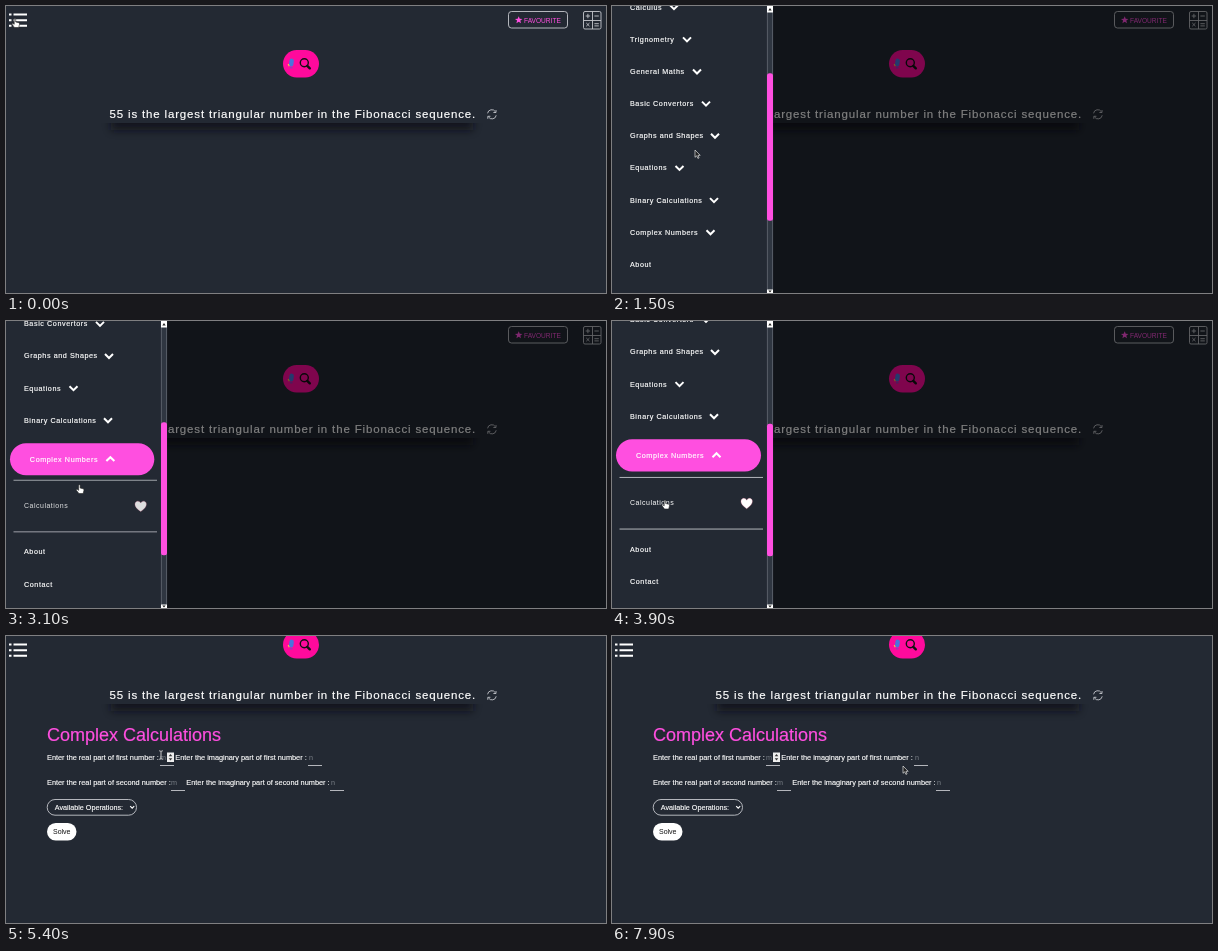
These frames come from a looping animation (600x287 px, 8 s). An HTML page:

```html
<!DOCTYPE html>
<html lang="en">
<head>
<meta charset="utf-8">
<title>Maths menu</title>
<style>
  html, body { margin: 0; width: 100%; height: 100%; overflow: hidden; background: #232933; }
  svg { display: block; font-family: "Liberation Sans", Arial, sans-serif; fill: #fff; }
  .line { fill: none; stroke: #fff; }
  .thin { fill: none; stroke: #c4c7cc; stroke-width: .9; }
  .label { font-size: 7.35px; stroke: #fff; stroke-width: .15px; }
  .hint { font-size: 7.2px; fill: #7b8088; }
  .fact { font-size: 11.5px; letter-spacing: .84px; stroke: #fff; stroke-width: .2px; }
  #menu text { font-size: 7.2px; letter-spacing: .58px; stroke: #fff; stroke-width: .18px; }
  #menu .sub { font-size: 7px; letter-spacing: .5px; stroke: none; }
  .pink { fill: #ff4fe0; }
</style>
</head>
<body>
<svg width="600" height="287" viewBox="0 0 600 287">
  <defs>
    <filter id="blur" x="-10%" y="-200%" width="120%" height="500%"><feGaussianBlur stdDeviation="4"/></filter>
    <clipPath id="below"><rect x="95" y="117" width="390" height="30"/></clipPath>
  </defs>
  <rect width="600" height="287" fill="#232933"/>

  <g id="page">
    <rect class="thin" x="502.5" y="5.5" width="59" height="16.5" rx="3"/>
    <path class="pink" d="M0-4l1.2 3 3.2.2-2.5 2 .8 3.1-2.7-1.7-2.7 1.7.8-3.1-2.5-2 3.2-.2z" transform="translate(512.7 13.6) scale(.85)"/>
    <text class="pink" x="518" y="16.6" font-size="6.6">FAVOURITE</text>
    <g class="thin">
      <rect x="577.5" y="5.5" width="17.5" height="17.5" rx="1.5"/>
      <path d="M586.5 5.5v17.5M577.5 14.5h17.5M579.7 10h4.4M581.9 7.8v4.4M588.4 10h4.4M580.3 17l3.2 3.2M583.5 17l-3.2 3.2M588.4 17.7h4.4M588.4 19.9h4.4"/>
    </g>

    <rect x="277" y="44" width="36" height="27.5" rx="13.7" fill="#ff0a9c"/>
    <rect x="283.3" y="52.5" width="4.4" height="8" rx="2" fill="#4a74dc" transform="rotate(8 285 56)"/>
    <path d="M282.2 58l1 2.2" stroke="#ffc23d" stroke-width="1.1"/>
    <path d="M284 61.8h2.6" stroke="#8a3fc0" stroke-width="1.2"/>
    <circle cx="298.3" cy="56.8" r="4" fill="none" stroke="#111" stroke-width="1.4"/>
    <path d="M301.3 59.8l2.5 2.5" stroke="#111" stroke-width="2.4" stroke-linecap="round"/>

    <g clip-path="url(#below)"><rect x="105" y="104" width="362" height="20" fill="#0d1118" opacity=".75" filter="url(#blur)"/></g>
    <text class="fact" x="103.5" y="112">55 is the largest triangular number in the Fibonacci sequence.</text>
    <path class="thin" d="M481.6 107.3a4.2 4.2 0 0 1 7.8-1.5M490 104v2.5h-2.6M490.2 109.3a4.2 4.2 0 0 1-7.8 1.5M481.8 112.8v-2.5h2.6"/>

    <g id="form" transform="translate(0 49)">
      <text class="pink" x="41" y="104.6" font-size="18" stroke="#ff4fe0" stroke-width=".2">Complex Calculations</text>
      <g class="label">
        <text x="41" y="123.6">Enter the real part of first number :</text>
        <text x="169.3" y="123.6">Enter the imaginary part of first number :</text>
        <text x="41" y="149">Enter the real part of second number :</text>
        <text x="180.3" y="149">Enter the imaginary part of second number :</text>
        <text x="48.8" y="174" font-size="7.2">Available Operations:</text>
      </g>
      <g class="hint">
        <text x="154" y="123.6">m</text><text x="303" y="123.6">n</text>
        <text x="165" y="149">m</text><text x="325" y="149">n</text>
      </g>
      <path class="thin" d="M154 129.5h14M302 129.5h14M165 154.5h14M324 154.5h14"/>
      <g id="spinner">
        <rect x="161" y="116.5" width="7" height="9.5" fill="#eee"/>
        <path d="M162.7 120.3l1.8-2.3 1.8 2.3zM162.7 122.3l1.8 2.3 1.8-2.3z" fill="#333"/>
      </g>
      <path id="caret" d="M154.5 117v8.5" stroke="#fff" stroke-width=".8"/>
      <rect class="thin" x="41.2" y="163.5" width="89.3" height="15.7" rx="7.8"/>
      <path class="line" stroke-width="1.2" d="M124.2 170.2l2 2 2-2"/>
      <rect x="41" y="187" width="29.5" height="17.5" rx="8.7"/>
      <text x="47" y="198.3" font-size="7" fill="#111">Solve</text>
    </g>
  </g>

  <path class="line" stroke-width="2" d="M3 8.5h2.5M7.5 8.5h13.5M3 14.2h2.5M7.5 14.2h13.5M3 19.8h2.5M7.5 19.8h13.5"/>
  <rect id="shade" width="600" height="287" fill="#000"/>

  <g id="menu">
    <rect width="161" height="287" fill="#232933"/>
    <g id="list">
      <rect id="pill" class="pink"/>
      <g id="sub">
        <path class="thin" d="M7.5-25.5h143.5M7.5 26.1h143.5"/>
        <text class="sub" x="18" y="2.5">Calculations</text>
        <path d="M134.7 5.8c-8.4-5.6-5.8-10.4-2.8-10.4q1.9 0 2.8 1.9 .9-1.9 2.8-1.9c3 0 5.6 4.8-2.8 10.4z" stroke="#f8a" stroke-width=".3"/>
      </g>
    </g>
    <rect x="155" width="6" height="287" fill="#2f3641"/>
    <path d="M155.4 0v287M160.6 0v287" stroke="#6a7079" stroke-width=".7"/>
    <path d="M155 0h6v6.5h-6zM155 283.5h6v3.5h-6z"/>
    <path d="M156.3 4.5l1.7-2.5 1.7 2.5zM156.3 284.5h3.4l-1.7 2z" fill="#222"/>
    <rect id="thumb" class="pink" x="155" width="6" rx="2.5"/>
  </g>

  <g id="cursor" stroke="#222" stroke-width=".6">
    <path id="arrow" d="M0 0v7.3l1.7-1.5 1.2 2.6 1.2-.5-1.2-2.6h2.3z" fill="#222" stroke="#fff"/>
    <path id="hand" d="M-.8 0q.8-.8 1.5 0v3l3 .7q1 .4.8 1.6l-.8 3.2h-4.2l-2.6-3.4q.2-1.2 1.2-.6l1.1.8z"/>
    <path id="beam" d="M-1.8-4.2q1.8 0 1.8.8q0-.8 1.8-.8M0-3.4v6.8M-1.8 4.2q1.8 0 1.8-.8q0 .8 1.8.8" fill="none" stroke="#ddd" stroke-width=".9"/>
  </g>
</svg>
<script>
const LOOP = 8000, TOP = 59.4, STEP = 32.15, COMPLEX = 9, CLICK = 4000;
const el = id => document.getElementById(id);
const set = (node, attrs) => { for (const k in attrs) node.setAttribute(k, attrs[k]); };
const move = (node, x, y) => set(node, { transform: `translate(${x} ${y})` });
const show = (node, on) => { node.style.display = on ? '' : 'none'; };
const mix = (a, b, p) => a + (b - a) * p;
const ramp = (t, from, to) => {
  const p = Math.min(1, Math.max(0, (t - from) / (to - from)));
  return p * p * (3 - 2 * p);
};

// Linear interpolation through [time, ...values]
function follow(keys, t) {
  const i = keys.findIndex(k => k[0] > t);
  if (i < 0) return keys[keys.length - 1].slice(1);
  const a = keys[i - 1], b = keys[i], p = (t - a[0]) / (b[0] - a[0]);
  return a.slice(1).map((v, n) => mix(v, b[n + 1], p));
}

const svgNode = (tag, attrs, parent) => {
  const node = document.createElementNS('http://www.w3.org/2000/svg', tag);
  set(node, attrs);
  return parent.appendChild(node);
};

// Label and, for expandable entries, the chevron centre
const items = [
  ['Linear Algebra', 85], ['Conic Section', 82], ['Calculus', 62], ['Trignometry', 75],
  ['General Maths', 85], ['Basic Convertors', 94], ['Graphs and Shapes', 103],
  ['Equations', 67.5], ['Binary Calculations', 102], ['Complex Numbers', 98.5],
  ['About'], ['Contact'], ['Share to Plimchat'], ['Settings']
].map(([name, x]) => {
  const g = svgNode('g', {}, el('list'));
  svgNode('text', { x: 18, y: 2.5 }, g).textContent = name;
  const chevron = x && svgNode('path', { class: 'line', 'stroke-width': 2, d: 'M-4-1.9l4 4 4-4' }, g);
  if (name.startsWith('Share')) svgNode('circle', { cx: 95, cy: .5, r: 4.4, fill: '#2fc46c' }, g);
  return { g, chevron, x };
});

const scrollKeys = [[0, 0], [500, 0], [700, 44], [1500, 122.5], [2250, 197], [2600, 197], [3200, 221.4]];
const cursorKeys = [
  [0, 9, 13], [300, 9, 13], [650, 83, 123], [1000, 83, 123], [1500, 83, 144], [2200, 85, 153],
  [2900, 85, 153], [3300, 62, 175], [3700, 53, 179.5], [CLICK, 53, 179.5], [4700, 214, 153],
  [5100, 161, 121], [5400, 155, 119], [6200, 155, 119], [6500, 286, 158], [6800, 290, 159],
  [7100, 293, 148], [7300, 300, 140], [7600, 302, 139], [7700, 291, 130]
];
const cursorKinds = [[0, 'hand'], [350, 'arrow'], [2250, 'hand'], [4100, 'arrow'], [5100, 'beam'], [6250, 'arrow']];

function drawMenu(t) {
  const open = ramp(t, 300, 600) - ramp(t, CLICK, CLICK + 300);
  const grow = ramp(t, 2600, 3150);
  const [scroll] = follow(scrollKeys, t);
  move(el('menu'), -162 * (1 - open), 0);
  set(el('shade'), { opacity: open / 2 });

  items.forEach(({ g, chevron, x }, i) => {
    const own = i === COMPLEX;
    const push = own ? 7 : i > COMPLEX ? 69 : 0;
    move(g, own ? 6 * grow : 0, TOP + i * STEP - scroll + push * grow);
    if (chevron) set(chevron, { transform: `translate(${x} 0) scale(1 ${own ? 1 - 2 * grow : 1})` });
  });

  const y = TOP + COMPLEX * STEP - scroll + 7 * grow;
  const height = mix(22.5, 32.3, grow);
  set(el('pill'), {
    x: mix(3, 4, grow), y: y - height / 2, width: mix(115, 145, grow), height, rx: height / 2
  });
  show(el('pill'), t >= 2250);
  move(el('sub'), 0, y + 47.6 * grow);
  set(el('sub'), { opacity: ramp(t, 2800, 3200) });
  set(el('thumb'), { y: 6 + scroll * mix(.5, .437, grow), height: mix(147.5, 132.5, grow) });
}

function drawCursor(t) {
  const [x, y] = follow(cursorKeys, t);
  const kind = cursorKinds.filter(k => k[0] <= t).pop()[1];
  move(el('cursor'), x, y);
  for (const id of ['arrow', 'hand', 'beam']) show(el(id), id === kind);
}

function draw(now) {
  const t = now % LOOP;
  move(el('page'), 0, -49 * ramp(t, CLICK + 300, 4700));
  show(el('form'), t >= CLICK);
  show(el('spinner'), t >= 5400);
  show(el('caret'), t >= 6100 && (t - 6100) % 1200 < 600);
  drawMenu(t);
  drawCursor(t);
  requestAnimationFrame(() => draw(performance.now()));
}
draw(0);
</script>
</body>
</html>
```
